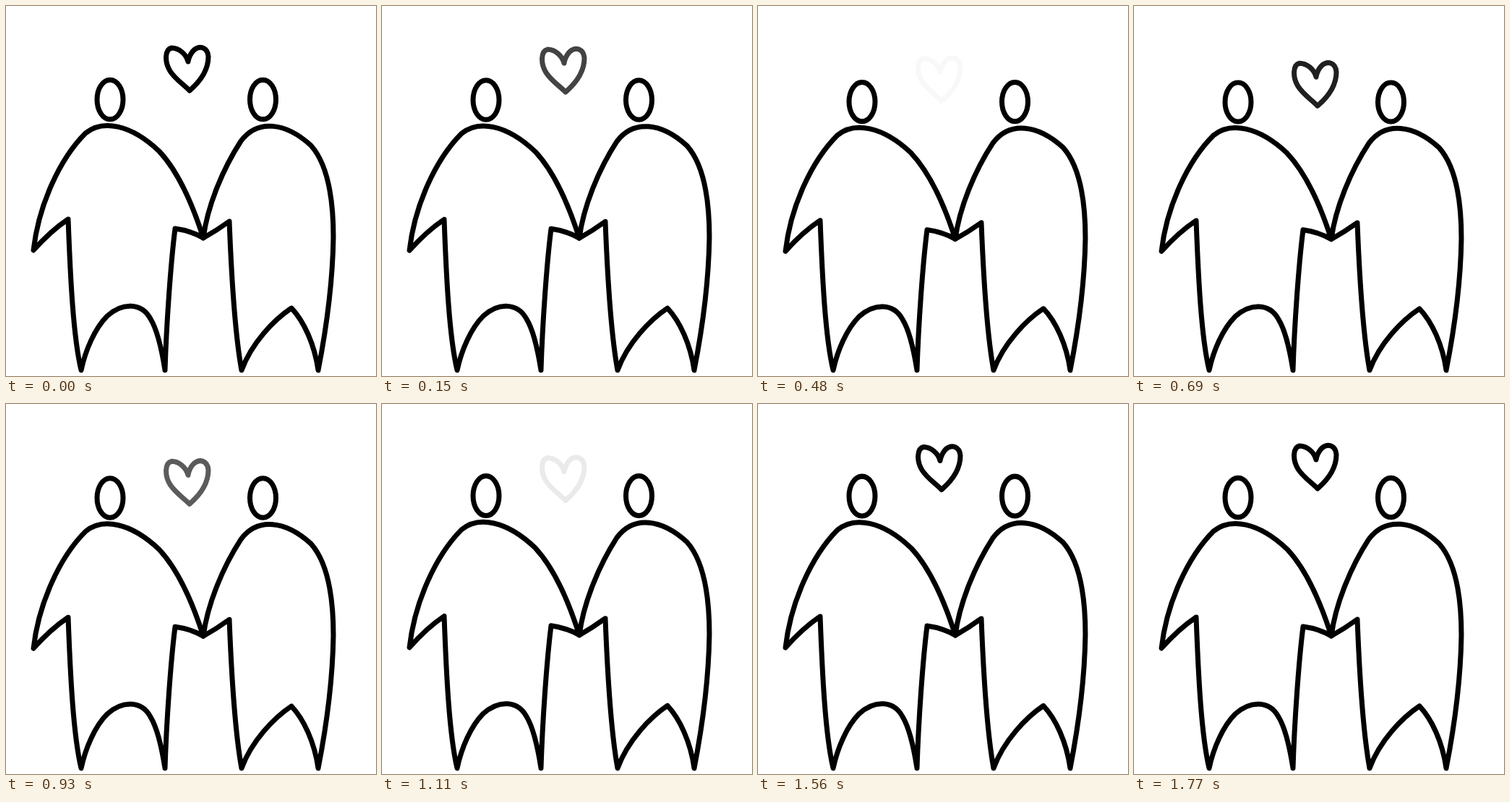
These frames come from a looping animation (512x512 px, 1.8 s). An HTML page:

```html
<!DOCTYPE html>
<html lang="en">
<head>
<meta charset="utf-8">
<title>Couple with heart</title>
<style>
html, body { margin: 0; height: 100%; overflow: hidden; background: #fff; }
svg { display: block; width: 100%; height: 100%; }
</style>
</head>
<body>
<svg viewBox="0 0 512 512" fill="none" stroke="#000" stroke-width="7" stroke-linecap="round" stroke-linejoin="round">
  <g id="couple">
    <ellipse cx="144" cy="129.5" rx="18" ry="27.3"/>
    <ellipse cx="355.5" cy="129.5" rx="18" ry="27.3"/>
    <path d="M38 338C45 276 74 212 110 176C133 157 172 163 212 201C240 231 259 277 273 321Q256 311 234 308C228 355 222 440 220 504C215 472 208 446 200 433C187 409 160 411 140 429C123 446 110 476 104 504C93 458 89 375 86 295Q62 311 38 338Z"/>
    <path d="M273 321C279 275 301 224 325 187C348 156 387 161 422 193C446 220 453 268 453 320C452 385 443 448 432 504C427 468 412 436 395 418C371 434 340 466 326 504C317 455 312 375 309 298Q291 311 273 321Z"/>
  </g>
  <path id="heart" d="M252 77C249 66 239 58 229 58C220 60 219 77 227 90C234 101 245 108 254 117C268 105 280 89 280 70C279 57 268 54 260 61C255 66 253 71 252 77Z"/>
</svg>
<script>
const LOOP = 1800, FLOOR = 506;
const couple = document.getElementById('couple');
const heart = document.getElementById('heart');

// Keys are [time, value]; each span eases in and out.
const stretch = [[0, 0], [630, 3.6], [1310, -4], [1800, 0]];
const drop = [[0, 0], [810, 22.5], [1700, 0], [1800, 0]];
const fade = [[0, 1], [450, 0], [760, 1], [1185, 0], [1200, 0], [1600, 1], [1800, 1]];

function at(keys, t) {
  const i = keys.findIndex(k => k[0] > t);
  const [t0, a] = keys[i - 1], [t1, b] = keys[i];
  const x = (t - t0) / (t1 - t0);
  return a + (b - a) * x * x * (3 - 2 * x);
}

function draw() {
  const t = performance.now() % LOOP;
  const scale = 1 - at(stretch, t) / 376;
  couple.setAttribute('transform', `translate(0 ${FLOOR * (1 - scale)}) scale(1 ${scale})`);
  heart.setAttribute('transform', `translate(0 ${at(drop, t)})`);
  heart.setAttribute('opacity', at(fade, t));
  requestAnimationFrame(draw);
}
draw();
</script>
</body>
</html>
```
